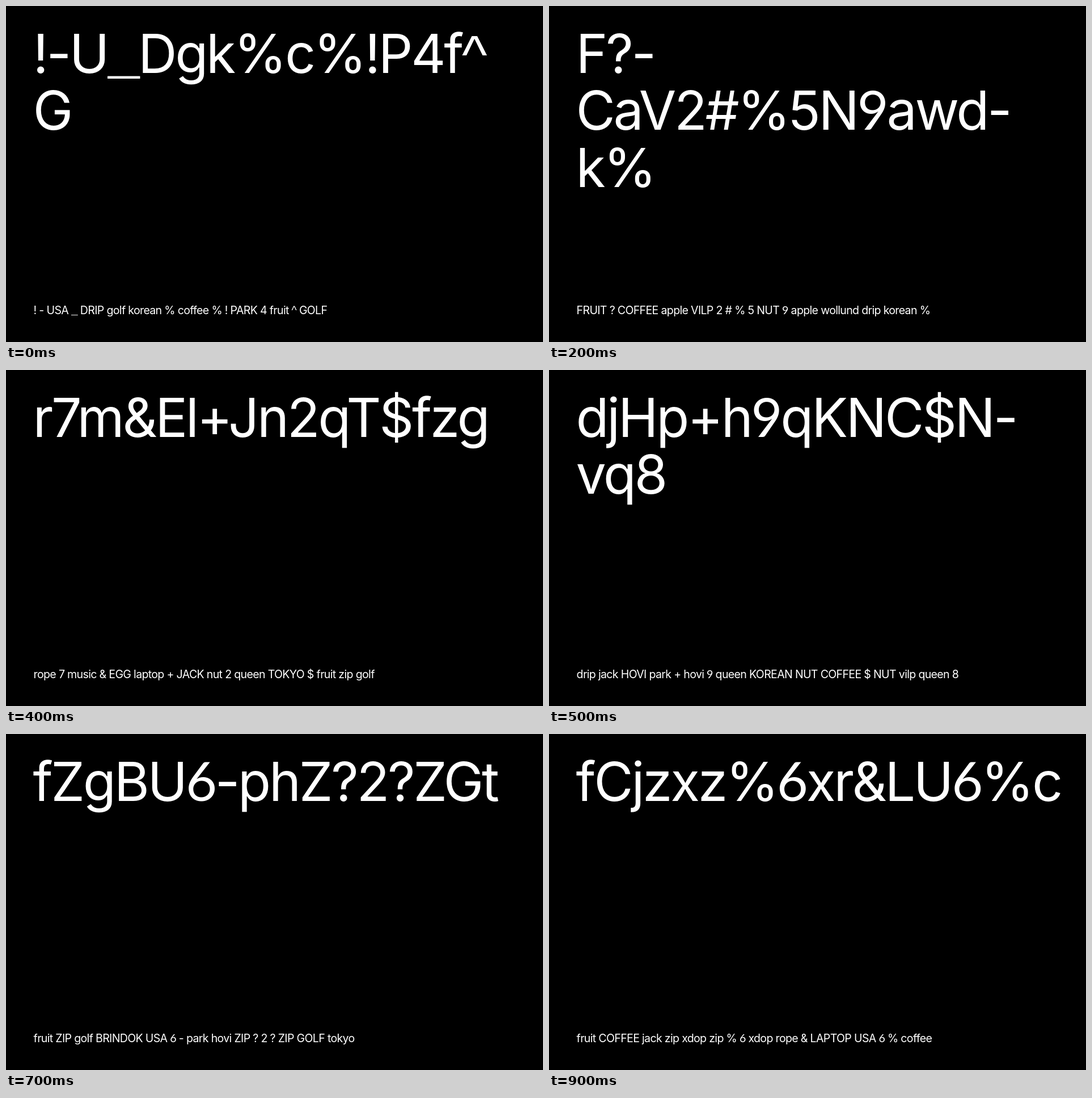
An HTML page for the animation above (1 s loop, 947 by 592 pixels).

```html
<!DOCTYPE html>
<html lang="en">
<head>
<meta charset="utf-8">
<title>Password phrases</title>
<style>
  html, body { margin: 0; width: 100%; height: 100%; overflow: hidden; background: #000; }
  svg { display: block; }
  text {
    fill: #fff;
    font-family: Inter, sans-serif;
    font-optical-sizing: none;
    font-feature-settings: "cv09", "calt" 0;
    letter-spacing: -0.035em;
    white-space: pre;
  }
  .big { font-size: 95px; }
  .small { font-size: 19.6px; }
  .digit { font-family: Lato, sans-serif; }
  .caret { font-family: "Liberation Sans", Arial, sans-serif; }
  .bar { font-family: "Liberation Mono", monospace; }
</style>
</head>
<body>
<svg id="stage" width="947" height="592" viewBox="0 0 947 592"></svg>
<script>
const stage = document.getElementById('stage');
const STEP = 100;

// "|" breaks the large text, "~" breaks it with a hyphen.
const PHRASES = [
  '! - USA _ DRIP golf korean % coffee % ! PARK 4 fruit ^ | GOLF',
  '3 _ YOFT XDOP ? MUSIC PARK APPLE 5 vilp # BRINDOK ~ NUT drip _ !',
  'FRUIT ? ~ COFFEE apple VILP 2 # % 5 NUT 9 apple wollund drip ~ korean %',
  '# EGG APPLE 3 park ? TOKYO @ drip jack zip ! korean KOREAN queen +',
  'rope 7 music & EGG laptop + JACK nut 2 queen TOKYO $ fruit zip golf',
  'drip jack HOVI park + hovi 9 queen KOREAN NUT COFFEE $ NUT ~ vilp queen 8',
  'nut PARK @ 4 jack egg usa ! COFFEE 9 drip rope ? zip LAPTOP #',
  'fruit ZIP golf BRINDOK USA 6 - park hovi ZIP ? 2 ? ZIP GOLF tokyo',
  'JACK 5 tokyo APPLE + golf nut 8 & ZIP korean ! drip EGG queen 3',
  'fruit COFFEE jack zip xdop zip % 6 xdop rope & LAPTOP USA 6 % coffee'
];

const initials = phrase => phrase.split(' ')
  .map(w => w === '|' ? '\n' : w === '~' ? '-\n' : w[0])
  .join('').split('\n');

const caption = phrase => phrase.replace(/ [|~]/g, '');

function add(parent, tag, attrs) {
  const el = document.createElementNS('http://www.w3.org/2000/svg', tag);
  for (const key in attrs) el.setAttribute(key, attrs[key]);
  return parent.appendChild(el);
}

// A few signs come from faces with straighter or wider forms.
const faceOf = run =>
  run[0] === '_' ? 'bar' : run[0] === '^' ? 'caret' : /[69]/.test(run) ? 'digit' : 'plain';

function addLine(parent, text, x, y, size) {
  const line = add(parent, 'text', { x, y, class: size });
  for (const run of text.match(/_+|\^+|[69]+|[^_^69]+/g)) {
    add(line, 'tspan', { class: faceOf(run) }).textContent = run;
  }
}

const slides = PHRASES.map(phrase => {
  const slide = add(stage, 'g', { visibility: 'hidden' });
  initials(phrase).forEach((line, i) => addLine(slide, line, 47.5, 118 + i * 100.4, 'big'));
  addLine(slide, caption(phrase), 48.6, 543, 'small');
  return slide;
});

const start = performance.now();
function tick() {
  const now = Math.floor((performance.now() - start) / STEP) % slides.length;
  slides.forEach((slide, i) => slide.setAttribute('visibility', i === now ? 'visible' : 'hidden'));
  requestAnimationFrame(tick);
}
tick();
</script>
</body>
</html>
```
